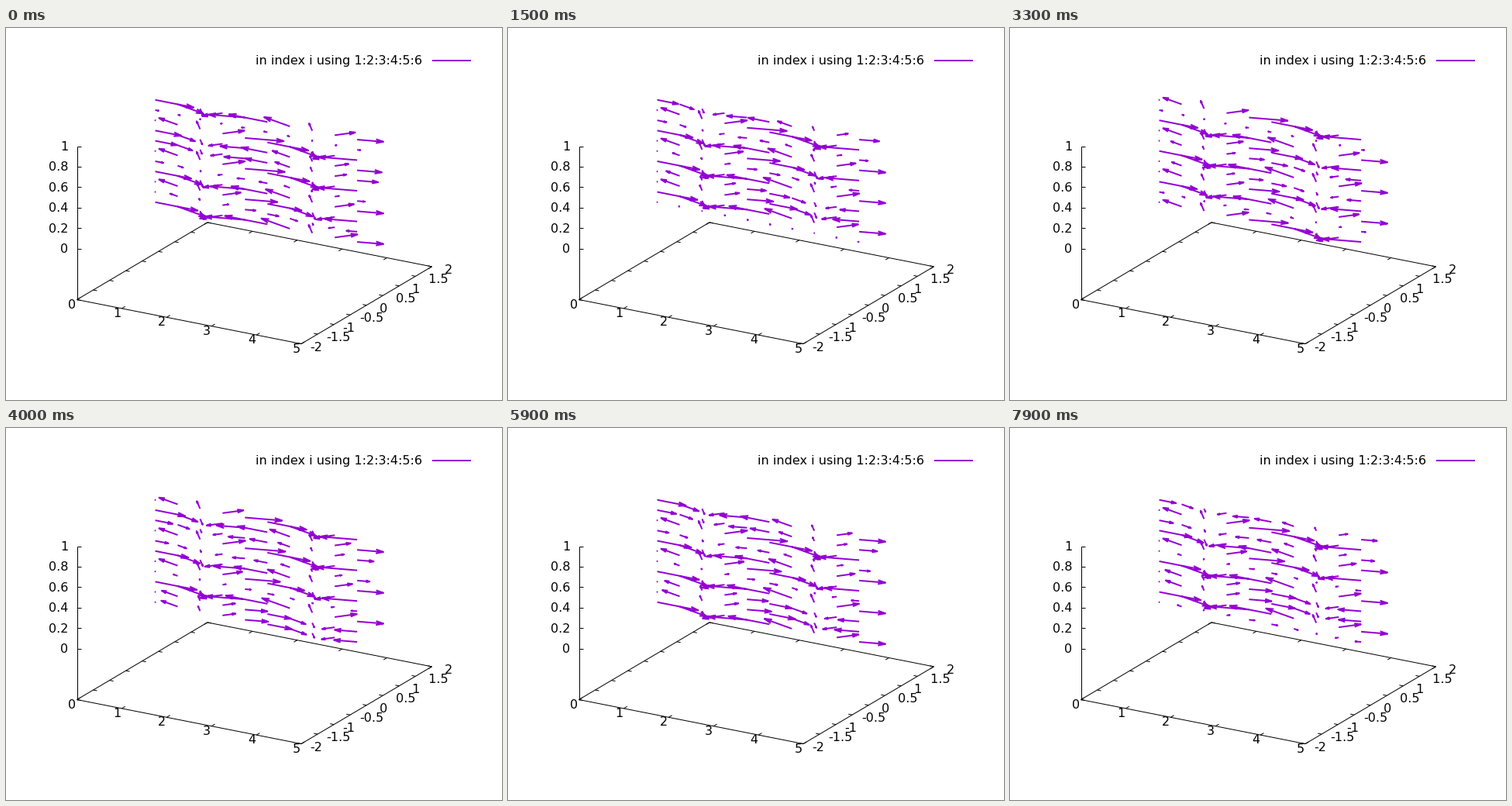
A matplotlib script for the animation above (8 s loop, 640 by 480 pixels).

```python
import numpy as np
import matplotlib.pyplot as plt
from matplotlib.animation import FuncAnimation

W, H, DPI = 640, 480, 100
PX = 72 / DPI
FRAMES, STEP_MS = 80, 100
PURPLE = "#9400d3"

# screen position of (0, -2, -0.5) and the pixel step of each unit axis
ORIGIN = np.array([91.5, 350.5])
AX_X = np.array([57.9, 11.4])
AX_Y = np.array([42.1, -24.9])
AX_Z = np.array([0.0, -132.0])
TIC = 5

Y0 = 0.4
KX, KY, KZ = 2 * np.pi / 5, np.pi / 4, 19.4
OMEGA, PHASE = 0.1, -0.1

plt.rcParams["font.family"] = "DejaVu Sans"
fig = plt.figure(figsize=(W / DPI, H / DPI), dpi=DPI, facecolor="white")
ax = fig.add_axes([0, 0, 1, 1])
ax.set_xlim(0, W)
ax.set_ylim(H, 0)
ax.axis("off")


def project(x, y, z):
    return ORIGIN + x * AX_X + (y + 2) * AX_Y + (z + 0.5) * AX_Z


def line(p, q, color="black", width=1.0):
    ax.plot([p[0], q[0]], [p[1], q[1]], color=color, lw=width * PX,
            solid_capstyle="butt")


def label(x, y, text, align):
    ax.text(x, y + 5.8, text, size=16 * PX, ha=align, va="baseline")


def tic(p, axis, sign=1):
    line(p, p + sign * TIC * axis / np.hypot(*axis))


def draw_frame_box():
    corners = [project(x, y, -0.5)
               for x, y in [(0, -2), (5, -2), (5, 2), (0, 2), (0, -2)]]
    for p, q in zip(corners, corners[1:]):
        line(p, q)
    line(project(0, -2, -0.5), project(0, -2, 1))

    for i in range(6):
        tic(project(i, -2, -0.5), AX_Y)
        tic(project(i, 2, -0.5), AX_Y, -1)
        label(85 + 58 * i, 355.8 + 11.4 * i, str(i), "center")

        z = i / 5
        p = project(0, -2, z)
        line(p, p + [TIC, 0])
        label(80, p[1] - 0.3, f"{z:g}", "right")

    for i in range(9):
        y = -2 + i / 2
        tic(project(0, y, -0.5), AX_X)
        tic(project(5, y, -0.5), AX_X, -1)
        label(392.5 + 21.1 * i, 411 - 12.5 * i, f"{y: g}", "left")

    label(537.5, 40.7, "in index i using 1:2:3:4:5:6", "right")
    line((550, 42), (600, 42), PURPLE, 2)


def arrow(start, delta):
    """Shaft and open head as one polyline, ended by a gap."""
    length = np.hypot(*delta)
    gap = [np.nan, np.nan]
    if length < 0.8:
        return [start - [0.8, 0], start + [0.8, 0], gap]
    tip = start + delta
    head = np.clip(0.3 * length, 0.3 * TIC, 2 * TIC)
    back = -delta / length * head
    c, s = np.cos(np.pi / 12), np.sin(np.pi / 12)
    left = tip + [c * back[0] - s * back[1], s * back[0] + c * back[1]]
    right = tip + [c * back[0] + s * back[1], -s * back[0] + c * back[1]]
    return [start, tip, gap, left, tip, right, gap]


def field(x, z, n):
    wave = np.cos(KZ * z - OMEGA * n + PHASE)
    vx = np.cos(KX * x) * np.cos(KY * Y0) * wave
    vy = -np.sin(KX * x) * np.sin(KY * Y0) * wave
    # cut the vector where it leaves 0 <= x <= 5
    room = 5 - x if vx > 0 else x
    cut = min(1.0, room / max(abs(vx), 1e-9))
    return cut * (vx * AX_X + vy * AX_Y)


draw_frame_box()
vectors, = ax.plot([], [], color=PURPLE, lw=2 * PX, solid_capstyle="butt",
                   solid_joinstyle="round", snap=False)


def update(n):
    points = []
    for x in np.arange(10) / 2:
        for z in np.arange(11) / 10:
            points += arrow(project(x, Y0, z), field(x, z, n))
    vectors.set_data(*np.array(points).T)
    return vectors,


anim = FuncAnimation(fig, update, frames=FRAMES, interval=STEP_MS,
                     repeat=True, repeat_delay=0)
plt.show()
```
